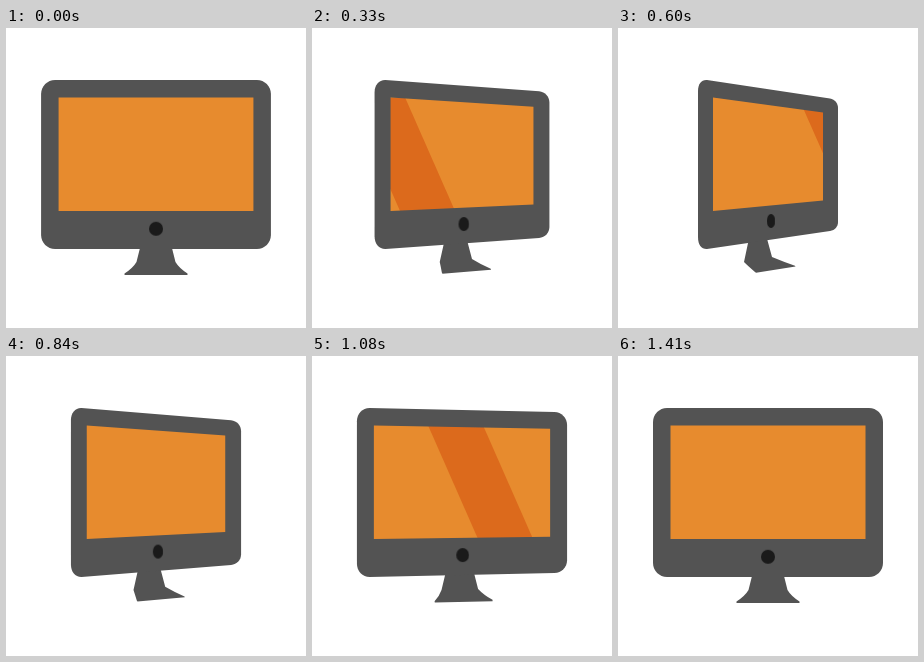
An HTML page for the animation above (3.62 s loop, 300x300 px).

```html
<!DOCTYPE html>
<html lang="en">
<head>
<meta charset="utf-8">
<title>Turning monitor</title>
<style>
  :root {
    --loop: 3620ms;
    --turn: cubic-bezier(.25, .1, .25, 1);
    --back: cubic-bezier(.75, 0, .75, .9);
  }
  html, body {
    margin: 0;
    width: 100%;
    height: 100%;
    overflow: hidden;
    background: #fff;
  }
  svg, .screen {
    position: absolute;
    left: 0;
    top: 0;
    width: 300px;
    height: 300px;
  }
  .body, .stand { fill: #535353; }
  .lens { fill: #1a1a1a; }
  .screen { background: #e78b2e; }
  .shine {
    position: absolute;
    left: 0;
    top: 70px;
    width: 55px;
    height: 116px;
    background: #dc6a1c;
    transform-origin: 0 0;
  }
  .body, .stand, .lens, .screen, .shine {
    animation: var(--loop) linear infinite;
  }
  .body { animation-name: body; }
  .stand { animation-name: stand; }
  .lens { animation-name: lens; }
  .screen { animation-name: screen; }
  .shine { animation-name: shine; }

  /* turn 0-540 ms, hold to 660 ms, turn back by 1200 ms */
  @keyframes body {
    0%, 33.149%, 100% {
      d: path("M35 66 C35 58.3 41.3 52 49 52 L251 52 C258.7 52 265 58.3 265 66 L265 207 C265 214.7 258.7 221 251 221 L49 221 C41.3 221 35 214.7 35 207 Z");
    }
    0% { animation-timing-function: var(--turn); }
    14.917%, 18.232% {
      d: path("M80 63 C80 56 83.5 51.5 89 52 L212 70.5 C217 71.3 220 75.5 220 80 L220 194 C220 198.5 217 202.2 212 203 L89 221 C83.5 221.3 80 217 80 209 Z");
    }
    18.232% { animation-timing-function: var(--back); }
  }
  @keyframes stand {
    0%, 33.149%, 100% {
      d: path("M135 216 L130.5 234 Q127 240 118.5 245.5 L118.5 247 L181.5 247 L181.5 245.5 Q173 240 169.5 234 L165 216 Z");
    }
    0% { animation-timing-function: var(--turn); }
    14.917%, 18.232% {
      d: path("M131.5 208 L126 234 Q130 238 137 244 L138 244.8 L177.5 238.5 L177 237.8 Q166 234 154 229 L148 207 Z");
    }
    18.232% { animation-timing-function: var(--back); }
  }
  @keyframes lens {
    0%, 33.149%, 100% { transform: translate(150px, 200.8px) scale(1, 1); }
    0% { animation-timing-function: var(--turn); }
    14.917%, 18.232% { transform: translate(153px, 193px) scale(.6, 1); }
    18.232% { animation-timing-function: var(--back); }
  }
  @keyframes screen {
    0%, 33.149%, 100% {
      clip-path: polygon(52.5px 69.5px, 247.5px 69.5px, 247.5px 183px, 52.5px 183px);
    }
    0% { animation-timing-function: var(--turn); }
    14.917%, 18.232% {
      clip-path: polygon(95px 69.5px, 205px 84.5px, 205px 172.5px, 95px 183px);
    }
    18.232% { animation-timing-function: var(--back); }
  }
  /* sweeps right 150-780 ms, then back left by 1410 ms */
  @keyframes shine {
    0%, 4.144%, 38.95%, 100% { transform: translateX(-57.1px) skewX(23.75deg); }
    21.547% { transform: translateX(275px) skewX(23.75deg); }
  }
</style>
</head>
<body>
  <svg viewBox="0 0 300 300">
    <path class="stand"/>
    <path class="body"/>
    <circle class="lens" r="7"/>
  </svg>
  <div class="screen"><div class="shine"></div></div>
</body>
</html>
```
